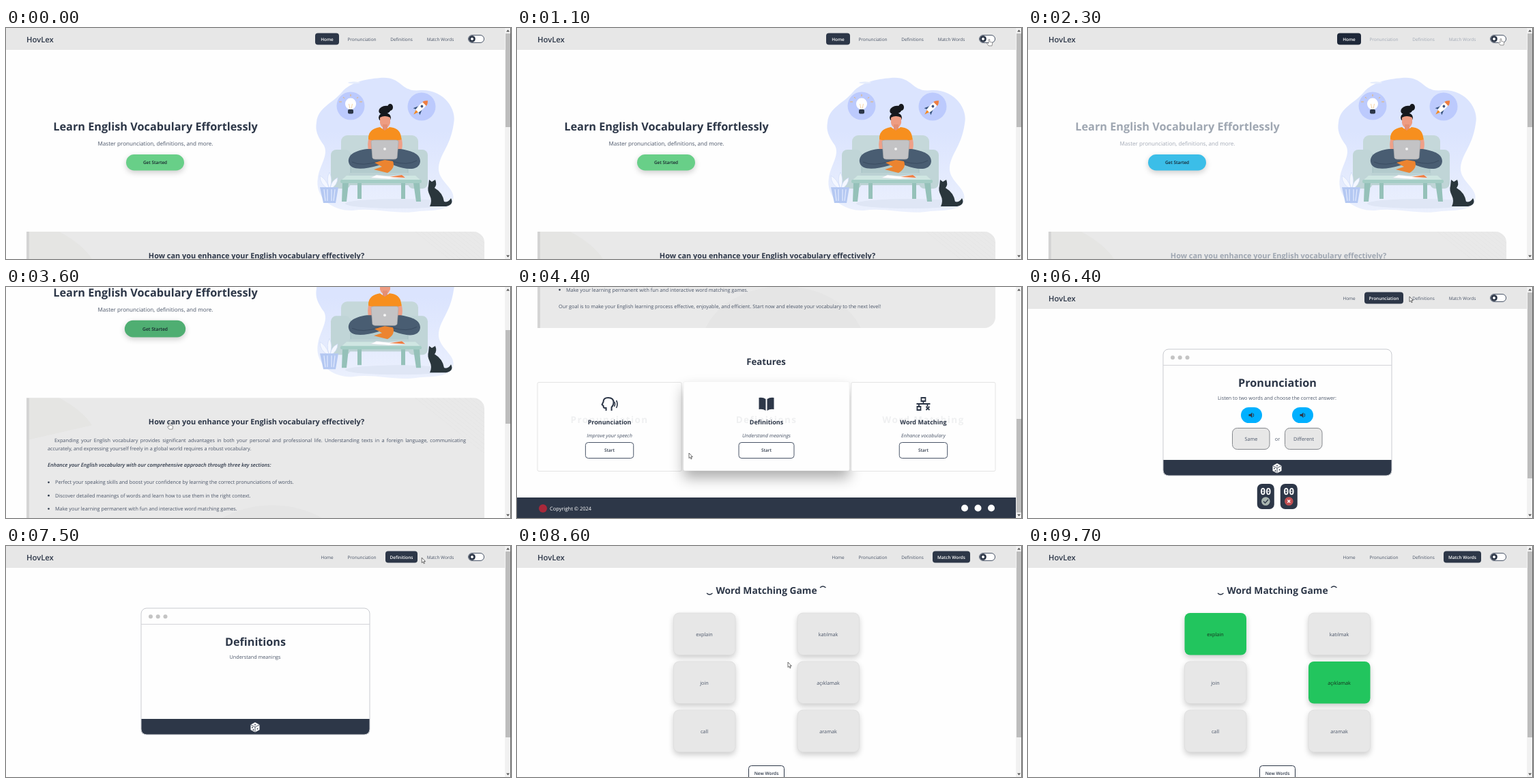
An HTML page with a canvas for the animation above (9900 ms loop, 740 by 338 pixels).

```html
<!DOCTYPE html>
<html lang="en">
<head>
<meta charset="utf-8">
<style>
  html, body { margin: 0; width: 100%; height: 100%; overflow: hidden; background: #fefefe; }
  canvas { display: block; }
</style>
</head>
<body>
<canvas id="stage" width="740" height="338"></canvas>
<script>
const ctx = document.getElementById('stage').getContext('2d');
const LOOP = 9900, NAVY = '#2d3748', GRAY = '#4a5568', PANEL = '#e7e7e7';
const TRACK = [
  [300, 560, 300], [1100, 691, 17], [2300, 692, 16], [3150, 234, 198], [3600, 239, 199],
  [4400, 252, 243], [4750, 136, 239], [5400, 150, 236], [5900, 330, 190], [6400, 559, 14],
  [6700, 580, 17], [7350, 582, 17], [7650, 636, 17], [8000, 636, 18], [8600, 397, 170],
  [8950, 276, 132], [9080, 276, 132], [9400, 456, 204]
];
const HAND_SPANS = [[1050, 2600], [3060, 3700], [4650, 4950], [6600, 7400], [7580, 8100], [8850, 9150], [9320, 9600]];
const NAV = [['Home', 453, 35], ['Pronunciation', 493, 57], ['Definitions', 556, 47], ['Match Words', 609, 55]];

const ramp = (t, a, b) => { const p = Math.min(1, Math.max(0, (t - a) / (b - a))); return p * p * (3 - 2 * p); };
const pulse = (t, a, b, c, d) => ramp(t, a, b) - ramp(t, c, d);
const mix = (a, b, p) => `rgb(${a.map((v, i) => Math.round(v + (b[i] - v) * p))})`;

function shape(d, fill, stroke, width = 1) {
  const path = new Path2D(d);
  if (fill) { ctx.fillStyle = fill; ctx.fill(path); }
  if (stroke) { ctx.strokeStyle = stroke; ctx.lineWidth = width; ctx.stroke(path); }
}
function box(x, y, w, h, r, fill, stroke, width = 1) {
  ctx.beginPath();
  ctx.roundRect(x, y, w, h, r);
  if (fill) { ctx.fillStyle = fill; ctx.fill(); }
  if (stroke) { ctx.strokeStyle = stroke; ctx.lineWidth = width; ctx.stroke(); }
}
function oval(x, y, rx, ry, fill, angle = 0) {
  ctx.beginPath();
  ctx.ellipse(x, y, rx, ry, angle, 0, 7);
  ctx.fillStyle = fill;
  ctx.fill();
}
function withShadow(color, blur, dy, draw) {
  ctx.save();
  ctx.shadowColor = color; ctx.shadowBlur = blur; ctx.shadowOffsetY = dy;
  draw();
  ctx.restore();
}
function label(s, x, y, size, color = NAVY, style = '400', align = 'center') {
  ctx.font = `${style} ${size}px "Open Sans", "Noto Sans", sans-serif`;
  ctx.textAlign = align;
  ctx.fillStyle = color;
  ctx.fillText(s, x, y + size * 0.34);
}
const left = (s, x, y, size, color, style) => label(s, x, y, size, color, style, 'left');

function justify(s, x, y, width, size, color) {
  const words = s.split(' ');
  ctx.font = `400 ${size}px "Open Sans", "Noto Sans", sans-serif`;
  const widths = words.map(w => ctx.measureText(w).width);
  const gap = (width - widths.reduce((a, b) => a + b)) / (words.length - 1);
  words.forEach((w, i) => { left(w, x, y, size, color); x += widths[i] + gap; });
}

function navbar(active, dark = false, fade = 0, soft = GRAY) {
  ctx.fillStyle = dark ? '#1f2937' : PANEL;
  ctx.fillRect(0, 0, 731, 32);
  left('HovLex', 30, 17, 11.3, dark ? '#e2e8f0' : NAVY, '600');
  NAV.forEach(([name, x, w], i) => {
    if (i === active) box(x, 7.5, w, 17, 4, mix([45, 55, 72], [22, 32, 48], fade));
    label(name, x + w / 2, 16.5, 6.45, i === active ? '#fff' : soft, i === active ? '600' : '400');
  });
  box(677.5, 10.5, 23, 11, 5.5, dark ? '#475569' : '#fff', GRAY);
  const knob = dark ? 695 : 683;
  oval(knob, 16, 4.8, 4.8, dark ? '#e2e8f0' : NAVY);
  oval(knob, 16, 2, 2, dark ? NAVY : '#fff');
}

function scrollbar(top, height) {
  ctx.fillStyle = '#f1f1f1';
  ctx.fillRect(731, 0, 9, 338);
  ctx.fillStyle = '#bdbdbd';
  ctx.fillRect(732, top, 7, height);
  shape('M733 5.5L735.5 2.5L738 5.5ZM733 332.5L735.5 335.5L738 332.5Z', '#555');
  ctx.fillStyle = '#666';
  ctx.fillRect(739, 0, 1, 338);
}

function illustration() {
  const sky = ctx.createLinearGradient(0, 72, 0, 270);
  sky.addColorStop(0.4, '#dbe4fe');
  sky.addColorStop(1, '#ebf0fd');
  shape('M492 94C505 79 526 75 548 73C582 70 576 95 608 91C642 90 661 119 656 140C651 176 633 186 634 208C636 226 660 236 655 252C648 268 630 266 606 268C572 274 540 262 508 267C478 268 452 248 457 219C460 200 473 186 466 172C456 158 453 150 455 138C457 116 478 111 492 94Z', sky);
  oval(510, 80, 9, 1.5, '#e6edfc');
  oval(588, 92, 5, 3, '#dbe4fe');
  oval(575, 257, 78, 7, '#dfe6f5');
  oval(505, 114, 20.5, 20.5, '#bccafd');
  oval(609, 115, 20.5, 20.5, '#bccafd');
  // bulb
  shape('M505 97V100M494 101L496 103M516 101L514 103M488 108H492M518 108H522', null, '#e8b26a');
  oval(505, 111, 8, 8.5, '#fff');
  box(501, 119, 8, 6.5, 2, NAVY);
  shape('M502.5 111L504 118M507.5 111L506 118', null, '#f2c07d', 0.7);
  // rocket
  ctx.save();
  ctx.translate(608, 116);
  ctx.rotate(0.8);
  shape('M-2.5 7L0 15L2.5 7Z', '#f58a21');
  shape('M-3 0L-7 9L0 6L7 9L3 0Z', '#34507a');
  shape('M0 -14C5.5 -7 4 3 3 8H-3C-4 3 -5.5 -7 0 -14Z', '#fff');
  shape('M0 -14C3 -11 4 -9 4 -7H-4C-4 -9 -3 -11 0 -14Z', '#ee7d42');
  oval(0, -2, 1.9, 1.9, '#3d5580');
  ctx.restore();
  // sofa
  box(491, 157, 113, 52, 9, '#c5d8da');
  box(500, 187, 96, 32, 5, '#b3cbcd');
  box(476, 178, 29, 57, 8, '#c0d5d7');
  box(589, 178, 29, 57, 8, '#c0d5d7');
  shape('M505 184V216M589 184V216', null, '#a5c0c3');
  ctx.fillStyle = '#bcd2d4';
  ctx.fillRect(503, 212, 88, 18);
  // person
  oval(555, 120, 9, 6, '#16181d', -0.3);
  oval(563, 116, 4, 5, '#16181d');
  oval(555, 131, 9, 7, '#16181d');
  shape('M548 131Q555 127 563 131V139Q561 146 555 147Q549 145 548 139Z', '#ee9c82');
  shape('M552 141H559V151H552Z', '#e48f74');
  shape('M531 159Q533 147 548 145L555 150L562 145Q577 146 579 159L580 164L571 165V178H540V165L531 164Z', '#f78f1e');
  shape('M531 163L538 165L541 181L535 184Q528 178 531 163ZM573 165L580 163Q583 179 575 184L570 180Z', '#eea088');
  shape('M529 177C508 180 501 187 502 196C504 208 522 208 546 201L560 196L569 201C590 209 606 208 607 195C607 185 597 180 578 177Z', '#495d72');
  shape('M507 196Q522 203 546 195M602 194Q588 202 566 195', null, '#3a4c61');
  shape('M540 197L555 193L567 195Q571 205 559 212L539 207L551 203Z', '#ec8430');
  shape('M535 166Q536 164 539 164H572Q575 164 575 167L573 190Q572 192 569 192H541Q538 192 537 190Z', '#c3c3c5', '#a9a9ab', 0.7);
  oval(555, 177, 2, 2, '#f4f4f4');
  // table
  shape('M499 216H600L609 224H490Z', '#cfe6e2');
  box(490, 222, 119, 5, 2, '#a4cdc5');
  shape('M493 227H502L499 254H492ZM597 227H606L608 254H601ZM515 227H521V250H515ZM579 227H585V250H579Z', '#95c1b9');
  shape('M534 219L543 215L561 217L580 215L586 219L561 221Z', '#fff', '#d7dbe4', 0.6);
  shape('M562 218L580 215L585 219Z', '#ee7d42');
  // plant
  shape('M472 235Q460 229 460 216Q469 221 473 233Q469 220 474 211Q479 221 475 234Q477 223 486 219Q486 230 475 236Z', '#f4f7ff', '#cbd8f6', 0.6);
  shape('M460 233H487L483 256H465Z', '#b4c8f2');
  shape('M466 236L468 253M471 236V253M477 236V253M482 236L480 253', null, '#e2eafd', 1.2);
  // cat
  shape('M620 222L624 225L629 222Q632 229 628 234Q640 241 642 254Q648 256 652 249Q657 258 645 261H621Q625 253 621 245Q617 237 619 231Z', '#2a363c');
}

function infoPanel(dark, ink, soft) {
  ctx.save();
  box(30, 298, 671, 218, [0, 16, 16, 0], dark ? '#1f2937' : '#e9e9e9');
  ctx.clip();
  if (!dark) {
    shape('M30 298H78Q112 316 126 338L30 360Z', '#e5e5e3');
    oval(390, 545, 120, 90, '#e5e5e5');
    for (let i = 0; i < 16; i++) shape(`M${600 + i * 8} 298l110 88`, null, '#e4e4e4', 0.7);
  }
  ctx.fillStyle = dark ? '#475569' : '#d4d4d4';
  ctx.fillRect(30, 298, 4, 218);
  ctx.restore();
  label('How can you enhance your English vocabulary effectively?', 367, 333, 10.9, ink, '700');
  justify('Expanding your English vocabulary provides significant advantages in both your personal and professional life. Understanding texts in a foreign language, communicating', 71, 360, 603, 7.3, soft);
  left('accurately, and expressing yourself freely in a global world requires a robust vocabulary.', 61, 372, 7.3, soft);
  left('Enhance your English vocabulary with our comprehensive approach through three key sections:', 61, 396.5, 7.57, ink, 'italic 600');
  ['Perfect your speaking skills and boost your confidence by learning the correct pronunciations of words.',
    'Discover detailed meanings of words and learn how to use them in the right context.',
    'Make your learning permanent with fun and interactive word matching games.'
  ].forEach((s, i) => {
    const y = 421.5 + i * 19.3;
    oval(62.5, y, 1.3, 1.3, ink);
    left(s, 72, y, 7.3, soft);
  });
  left('Our goal is to make your English learning process effective, enjoyable, and efficient. Start now and elevate your vocabulary to the next level!', 61, 484.5, 7.3, soft);
}

const ICONS = [
  () => {
    shape('M-5 10V6H-7Q-9 6 -9 3L-11 1L-9 -3Q-9 -9 -2 -9Q6 -9 6 -2Q6 2 3 5V10', null, NAVY, 2);
    shape('M7 -3Q9 0 7 4M10 -5Q13 0 10 6', null, NAVY, 1.6);
  },
  () => shape('M-1 -7Q-5 -10 -11 -9V8Q-5 7 -1 10ZM1 -7Q5 -10 11 -9V8Q5 7 1 10Z', NAVY),
  () => {
    shape('M-3 -9H3V-4H-3ZM-9 4H-4V9H-9ZM0 -4V0M-10 0H10M-6.5 0V4M6 0V4', null, NAVY, 1.8);
    shape('M4 4L9 9M9 4L4 9', null, NAVY, 1.8);
  }
];

function features(hover) {
  label('Features', 365, 565, 13.25, NAVY, '700');
  const total = 3 + 0.15 * hover.reduce((a, b) => a + b);
  let x = 30;
  [['Pronunciation', 'Improve your speech'], ['Definitions', 'Understand meanings'], ['Word Matching', 'Enhance vocabulary']].forEach(([title, note], i) => {
    const h = hover[i], w = 665 * (1 + 0.15 * h) / total, mid = x + w / 2, y = 595.5 - h;
    if (h > 0.01) withShadow(`rgba(0,0,0,${0.32 * h})`, 20, 11, () => box(x, y, w, 130, 2, '#fefefe'));
    box(x, y, w, 130, 2, '#fefefe', h > 0.5 ? '#f4f4f4' : '#e4e4e4');
    ctx.letterSpacing = '1.4px';
    label(title, mid, 650, 13.5, 'rgba(45,55,72,.07)', '700');
    ctx.letterSpacing = '0px';
    ctx.save();
    ctx.translate(mid, 627);
    ICONS[i]();
    ctx.restore();
    label(title, mid, 654, 9, NAVY, '700');
    label(note, mid, 674, 7.3, GRAY, 'italic 400');
    box(mid - w / 6, 683.5, w / 3, 23, 4, '#fff', GRAY);
    label('Start', mid, 695, 6.4, NAVY, '600');
    x += w + 3;
  });
}

function home(t) {
  const dark = t >= 1595 && t < 2295;
  const fade = t < 2100 ? ramp(t, 1560, 1900) : 1 - ramp(t, 2120, 2560);
  const ink = mix([45, 55, 72], [226, 232, 240], fade), soft = mix([74, 85, 104], [215, 220, 228], fade);
  const scroll = 456 * ramp(t, 3262, 4200);
  ctx.save();
  ctx.translate(0, -scroll);
  if (dark) { ctx.fillStyle = '#111827'; ctx.fillRect(0, 0, 740, 800); }
  navbar(0, dark, fade, soft);
  label('Learn English Vocabulary Effortlessly', 219, 144.5, 16.3, ink, '700');
  label('Master pronunciation, definitions, and more.', 219, 169, 8.15, soft);
  const press = pulse(t, 3000, 3150, 4000, 4200), grow = 1 + 0.05 * press;
  const tint = press ? mix([104, 207, 136], [79, 174, 114], press) : mix([104, 207, 136], [59, 190, 232], Math.min(1, fade * 1.6));
  ctx.save();
  ctx.translate(218.5, 196.5);
  ctx.scale(grow, grow);
  withShadow('rgba(0,0,0,.2)', 9, 3, () => box(-42.5, -11.5, 85, 23.5, 12, tint));
  label('Get Started', 0, 0.5, 6.4, '#16202c', '600');
  ctx.restore();
  illustration();
  infoPanel(dark, ink, soft);
  features([ramp(t, 4470, 4650), pulse(t, 3950, 4150, 4470, 4650), 0]);
  ctx.fillStyle = NAVY;
  ctx.fillRect(0, 764, 731, 30);
  oval(38, 780, 6, 6, '#a8283a');
  left('Copyright © 2024', 48, 780, 7.5, '#fff');
  [656, 675.5, 695].forEach(x => oval(x, 779.5, 5, 5, '#fff'));
  ctx.restore();
  scrollbar(8 + 185 * scroll / 456, 137);
}

function appWindow(title, note) {
  box(198, 91, 335, 185, 8, '#fefefe');
  shape('M198 253H533V268Q533 276 525 276H206Q198 276 198 268Z', NAVY);
  box(198, 91, 335, 185, 8, null, '#c9cbd0');
  shape('M198 114.5H533', null, '#d3d4d8');
  [212, 222.7, 233.5].forEach(x => oval(x, 103.3, 3, 3, '#c4c4c4'));
  label(title, 365.5, 140.5, 16.2, NAVY, '700');
  label(note, 365, 163, 7.25, GRAY);
  shape('M365 258L371.5 261.5V269L365 272.5L358.5 269V261.5Z', '#fff');
  shape('M358.5 261.5L365 265L371.5 261.5M365 265V272.5', null, NAVY, 0.8);
  [[365, 261.5], [361, 265.5], [362.5, 269], [368.5, 267.5]].forEach(([x, y]) => oval(x, y, 0.9, 0.9, NAVY));
}

function pronunciation() {
  appWindow('Pronunciation', 'Listen to two words and choose the correct answer:');
  [327.5, 402.5].forEach(x => {
    box(x - 15.5, 176, 31, 23, 11.5, '#00b0ff');
    shape(`M${x - 4} 186H${x - 1.5}L${x + 1} 183.5V191.5L${x - 1.5} 189H${x - 4}Z`, NAVY);
    shape(`M${x + 2.5} 185Q${x + 4} 187.5 ${x + 2.5} 190`, null, NAVY);
  });
  [['Same', 327], ['Different', 404]].forEach(([s, x]) => {
    box(x - 27.5, 206.5, 54.5, 31, 7, PANEL, '#85888d');
    label(s, x, 222.5, 7.25, GRAY);
  });
  label('or', 365.5, 222.5, 7.25, GRAY);
  [348.3, 382.3].forEach((x, i) => {
    box(x - 12.5, 288, 25, 37, 7, NAVY);
    ctx.font = 'bold 13.5px "DejaVu Sans Mono", monospace';
    ctx.textAlign = 'center';
    ctx.fillStyle = '#fff';
    ctx.fillText('00', x, 304);
    oval(x, 313.5, 6.3, 6.3, i ? '#c24f52' : '#a9b5b0');
    shape(i ? 'M380.3 311.5L384.3 315.5M384.3 311.5L380.3 315.5' : 'M345 313.5L347.5 316L352 311', null, i ? '#fff' : NAVY, 1.3);
  });
}

function matching(t) {
  label('Word Matching Game', 365.5, 65.5, 13.8, NAVY, '700');
  shape('M278 69Q282 73 286.5 69M444 61Q448 57 452.5 61', null, NAVY, 1.2);
  const picked = ramp(t, 9000, 9080), solved = ramp(t, 9400, 9600);
  [['explain', 'katılmak'], ['join', 'açıklamak'], ['call', 'aramak']].forEach((row, r) => row.forEach((word, c) => {
    const x = c ? 410.5 : 229, y = 98 + r * 71, first = !r && !c, match = first || (r === 1 && c === 1);
    const base = first ? 231 - 22 * picked : 231;
    const fill = match ? mix([base, base, base], [34, 197, 94], solved) : PANEL;
    withShadow('rgba(0,0,0,.2)', 9, 4, () => box(x + 0.5, y, 90.5, 61.5, 8, fill));
    if (!match || !solved) box(x + 0.5, y, 90.5, 61.5, 8, null, '#dcdcdc', 0.7);
    label(word, x + 45.5, y + 31.5, 7.27, match && solved > 0.5 ? '#17301f' : GRAY);
  }));
  box(339.5, 321.5, 52, 24, 4, '#fff', NAVY);
  label('New Words', 365.5, 333, 6.5, NAVY, '600');
}

function cursor(t) {
  if (t < 300 || t > 9620) return;
  const i = TRACK.findIndex(k => k[0] > t);
  const b = i < 0 ? TRACK[TRACK.length - 1] : TRACK[i], a = i < 0 ? b : TRACK[i - 1];
  const p = a === b ? 0 : ramp(t, a[0], b[0]);
  ctx.save();
  ctx.translate(a[1] + (b[1] - a[1]) * p, a[2] + (b[2] - a[2]) * p);
  if (HAND_SPANS.some(([from, to]) => t >= from && t < to)) {
    shape('M0 0Q1 -1 1.8 0V3.5L5 4Q6 4.5 5.5 6L5 9H0L-2.5 5.5Q-2 4 0 5.5Z', '#fff', '#555', 0.6);
  } else {
    shape('M0 0V7.5L1.7 6L3 8.8L4.2 8.2L3 5.5H5.3Z', '#fff', '#333', 0.7);
  }
  ctx.restore();
}

function draw(now) {
  const t = now % LOOP;
  ctx.textRendering = 'geometricPrecision';
  ctx.fillStyle = '#fefefe';
  ctx.fillRect(0, 0, 740, 338);
  if (t < 4900) {
    home(t);
  } else {
    const page = t < 6800 ? 1 : t < 7700 ? 2 : 3;
    navbar(page);
    if (page === 1) pronunciation();
    else if (page === 2) appWindow('Definitions', 'Understand meanings');
    else matching(t);
    scrollbar(8, 272);
  }
  cursor(t);
}

const start = performance.now();
function tick() {
  draw(performance.now() - start);
  requestAnimationFrame(tick);
}
tick();
</script>
</body>
</html>
```
